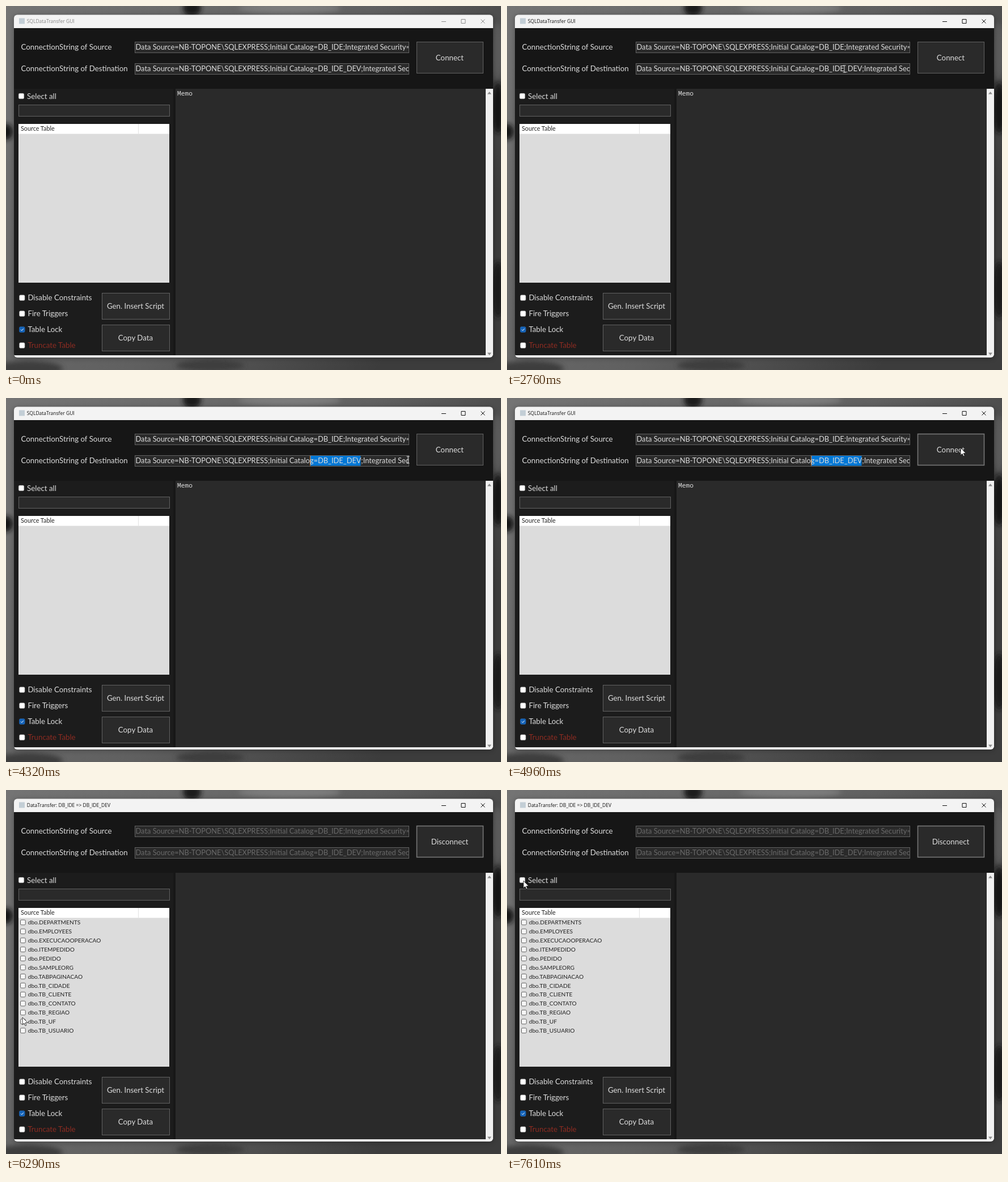
An HTML page that plays this animation: 873 by 642 pixels, repeating every 8000 ms.

```html
<!DOCTYPE html>
<html lang="en">
<head>
<meta charset="utf-8">
<title>Data transfer window</title>
<style>
html, body { margin: 0; width: 100%; height: 100%; overflow: hidden; background: #555; }
svg { display: block; width: 873px; height: 642px; }
text { font-family: Lato, "Open Sans", sans-serif; font-size: 13.3px; fill: #dcdcdc; white-space: pre; }
.edit { font-size: 12.85px; }
.head { font-size: 10.8px; fill: #222; }
.row { font-size: 10.2px; fill: #222; }
.caption { font-family: "Open Sans", "Noto Sans", sans-serif; font-size: 8.5px; }
.mono { font-family: "Noto Sans Mono", "DejaVu Sans Mono", monospace; font-size: 11.2px; }
.mid { text-anchor: middle; }
</style>
</head>
<body>
<svg id="stage" viewBox="0 0 873 642">
  <defs>
    <linearGradient id="desk" x2="1" y2=".5">
      <stop offset="0" stop-color="#747474"/>
      <stop offset=".6" stop-color="#606060"/>
      <stop offset="1" stop-color="#3c3c3c"/>
    </linearGradient>
    <clipPath id="win"><rect x="14" y="15.5" width="845" height="604.5" rx="6"/></clipPath>
    <clipPath id="fields"><rect x="228" y="60" width="482" height="64"/></clipPath>
    <filter id="soft" x="-50%" y="-50%" width="200%" height="200%"><feGaussianBlur stdDeviation="4"/></filter>
  </defs>
  <rect width="873" height="642" fill="url(#desk)"/>
</svg>
<script>
const NS = "http://www.w3.org/2000/svg";
const stage = document.getElementById("stage");
const LOOP = 8000, ACTIVE = 1800, PRESSED = 4880, CONNECTED = 5080;

function add(parent, tag, attrs, content) {
  const el = document.createElementNS(NS, tag);
  for (const key in attrs) el.setAttribute(key, attrs[key]);
  if (content) el.textContent = content;
  parent.appendChild(el);
  return el;
}
const group = (parent, attrs) => add(parent, "g", attrs);
const rect = (parent, x, y, width, height, fill, more) =>
  add(parent, "rect", { x, y, width, height, fill, ...more });
const path = (parent, d, stroke, more) => add(parent, "path", { d, stroke, fill: "none", ...more });
const label = (parent, x, y, content, cls, more) =>
  add(parent, "text", { x, y, class: cls || "", ...more }, content);
const show = (el, on) => el.setAttribute("visibility", on ? "visible" : "hidden");

// Blurred photo behind the window, seen only as a rim
const blot = (cx, cy, rx, ry, fill) =>
  add(stage, "ellipse", { cx, cy, rx, ry, fill, filter: "url(#soft)" });
blot(328, 4, 16, 14, "#1a1a1a");
blot(500, 4, 90, 10, "#7c7c7c");
blot(0, 222, 12, 14, "#161616");
blot(866, 80, 12, 50, "#5c5c5c");
blot(868, 180, 12, 45, "#161616");
blot(868, 500, 12, 50, "#1a1a1a");
blot(40, 640, 60, 14, "#3c3c3c");
blot(360, 634, 60, 10, "#3c3c3c");
rect(stage, 13, 16, 847, 606, "#000", { rx: 8, opacity: 0.25, filter: "url(#soft)" });

// Window panels
const win = group(stage, { "clip-path": "url(#win)" });
rect(win, 14, 15, 845, 605, "#f3f3f3");
rect(win, 14, 39, 845, 107, "#161616");
rect(win, 14, 146, 285, 470, "#1c1c1c");
rect(win, 295, 146, 4, 470, "#171717");
rect(win, 299, 146, 547, 470, "#2a2a2a");
rect(win, 846, 146, 13, 470, "#f0f0f0");
path(win, "M849 155.5 h7 l-3.5 -4.5 Z M849 611.5 h7 l-3.5 4.5 Z", "none", { style: "fill:#8c8c8c" });

// Title bar
rect(win, 23, 21.5, 10, 10, "#c3ced6");
const title = label(win, 36.7, 30.2, "", "caption");
const buttons = path(win, "M768 27.5 h8 M803 23.5 h7 v7 h-7 Z M837.5 23.5 l7 7 M844.5 23.5 l-7 7", "#111");

// Boxes with a thin frame
const frame = (x, y, w, h) =>
  rect(win, x + .5, y + .5, w - 1, h - 1, "#2a2a2a", { stroke: "#626262" });
function button(x, y, w, h, caption) {
  const box = frame(x, y, w, h);
  return [box, label(win, x + w / 2 - .5, y + h / 2 + 4.5, caption, "mid")];
}

label(win, 26.5, 77.2, "ConnectionString of Source");
label(win, 26.5, 115.2, "ConnectionString of Destination");
frame(227, 63, 484, 20);
frame(227, 101, 484, 20);
const mark = rect(win, 537, 102, 0, 17.5, "#0078d7");
const caret = rect(win, 536, 102, 1, 17.5, "#e98a3a");
const fields = group(win, { "clip-path": "url(#fields)" });
const link = db => `Data Source=NB-TOPONE\\SQLEXPRESS;Initial Catalog=${db};Integrated Security=SSPI`;
const edits = ["DB_IDE", "DB_IDE_DEV"].map((db, i) => label(fields, 228.5, 77.2 + 38 * i, link(db), "edit"));
const [connectBox, connectText] = button(724, 63, 118, 56, "Connect");

// Left side
function check(x, y, caption, on, fill) {
  rect(win, x, y - 4.7, 9.6, 9.6, on ? "#1463b8" : "#fff",
    { rx: 2, stroke: on ? "#2a70bd" : "#8a8a8a", "stroke-width": .6 });
  if (on) path(win, `M${x + 2.5} ${y + .2} l1.8 1.8 l3 -3.4`, "#fff");
  label(win, x + 14.9, y + 4.8, caption, "", fill && { style: "fill:" + fill });
}
check(22.2, 158.8, "Select all");
frame(22, 174, 267, 21);
rect(win, 22, 208, 266, 280, "#dcdcdc");
rect(win, 22, 208, 266, 17.5, "#fff");
const hot = rect(win, 22, 208, 211, 17.5, "#d9ebf9");
rect(win, 233, 208, 1, 17.5, "#e2e2e2");
label(win, 26, 219.8, "Source Table", "head");

const list = group(win);
["DEPARTMENTS", "EMPLOYEES", "EXECUCAOOPERACAO", "ITEMPEDIDO", "PEDIDO", "SAMPLEORG", "TABPAGINACAO",
 "TB_CIDADE", "TB_CLIENTE", "TB_CONTATO", "TB_REGIAO", "TB_UF", "TB_USUARIO"].forEach((name, i) => {
  const y = 233.5 + i * 15.9;
  rect(list, 25.5, y - 4.4, 8.8, 8.8, "#f6f6f6", { rx: 1.8, stroke: "#555", "stroke-width": .9 });
  label(list, 38.7, y + 3.7, "dbo." + name, "row");
});

["Disable Constraints", "Fire Triggers", "Table Lock", "Truncate Table"].forEach((caption, i) =>
  check(23.5, 514.5 + 28 * i, caption, i === 2, i === 3 && "#8e2c22"));
button(169, 506, 120, 47, "Gen. Insert Script");
button(169, 562, 120, 47, "Copy Data");
const memo = label(win, 302, 157.8, "Memo", "mono");

// Pointers
const arrow = path(stage, "M0 0 V13 L3 10.3 L5 14.8 L7 13.9 L5 9.6 H9.3 Z", "#111",
  { style: "fill:#fff", "stroke-width": .8 });
const beam = path(stage, "M-2.5 -6 H2.5 M0 -6 V6 M-2.5 6 H2.5", "#e0e0e0");

// Mouse moves: start and end time, then the place reached; equal times jump
const moves = [
  [480, 480, 859, 341], [480, 600, 698, 154], [760, 1280, 553, 72], [1760, 2200, 597, 75],
  [2480, 2760, 595, 111], [2760, 2920, 557, 72], [2920, 3120, 620, 112], [3280, 4040, 541, 112],
  [4120, 4320, 709, 109], [4320, 4520, 800, 88], [5480, 5520, 790, 103], [5520, 5680, 257, 162],
  [5890, 5890, 500, 262], [5890, 6130, 51, 440],
  [6290, 6290, 29, 401], [6290, 6410, 23, 393], [6570, 7370, 29, 172], [7410, 7610, 29, 160]
];
const easeOut = k => 1 - (1 - k) ** 2;
const progress = (t, from, to) => to > from ? Math.min(1, Math.max(0, (t - from) / (to - from))) : 1;

function pointer(t) {
  const p = { x: 0, y: 0 };
  for (const [from, to, x, y] of moves) {
    if (t < from) break;
    const k = easeOut(progress(t, from, to));
    p.x += (x - p.x) * k;
    p.y += (y - p.y) * k;
  }
  return p;
}

const hidden = t => t < 480 || t >= 5680 && t < 5890 || t >= 6130 && t < 6290;
const within = (p, x, y, w, h) => p.x >= x && p.x < x + w && p.y >= y && p.y < y + h;

function draw(now) {
  // Steps of 40 ms, shifted after 5690 ms
  const base = now < 5690 ? 0 : 5690;
  const t = base + Math.floor((now - base) / 40) * 40;
  const active = t >= ACTIVE, connected = t >= CONNECTED;

  title.textContent = connected ? "DataTransfer: DB_IDE => DB_IDE_DEV" : "SQLDataTransfer GUI";
  title.style.fill = active ? "#111" : "#858585";
  buttons.setAttribute("stroke", active ? "#111" : "#8c8c8c");
  edits.forEach(e => e.style.fill = connected ? "#696969" : "#dcdcdc");
  connectText.textContent = connected ? "Disconnect" : "Connect";
  connectBox.setAttribute("stroke", t >= PRESSED ? "#777" : "#626262");
  connectBox.setAttribute("stroke-width", t >= PRESSED ? 1.6 : 1);
  show(list, connected);
  show(memo, !connected);

  // The selection grows leftwards over eleven letters
  const marked = t >= 3280 && !connected;
  const letters = Math.round(easeOut(progress(t, 3280, 4040)) * 11);
  const width = letters * 88.5 / 11;
  mark.setAttribute("x", 625.5 - width);
  mark.setAttribute("width", width);
  caret.setAttribute("x", 624.5 - width);
  show(mark, marked);
  show(caret, marked);

  const p = pointer(t), seen = !hidden(t);
  const typing = within(p, 299, 146, 547, 470) ||
    !connected && (within(p, 227, 63, 484, 20) || within(p, 227, 101, 484, 20));
  show(hot, seen && connected && within(p, 22, 208, 211, 17.5));
  show(beam, seen && typing);
  show(arrow, seen && !typing);
  (typing ? beam : arrow).setAttribute("transform", `translate(${p.x} ${p.y})`);
}

function tick() {
  draw(performance.now() % LOOP);
  requestAnimationFrame(tick);
}
tick();
</script>
</body>
</html>
```
